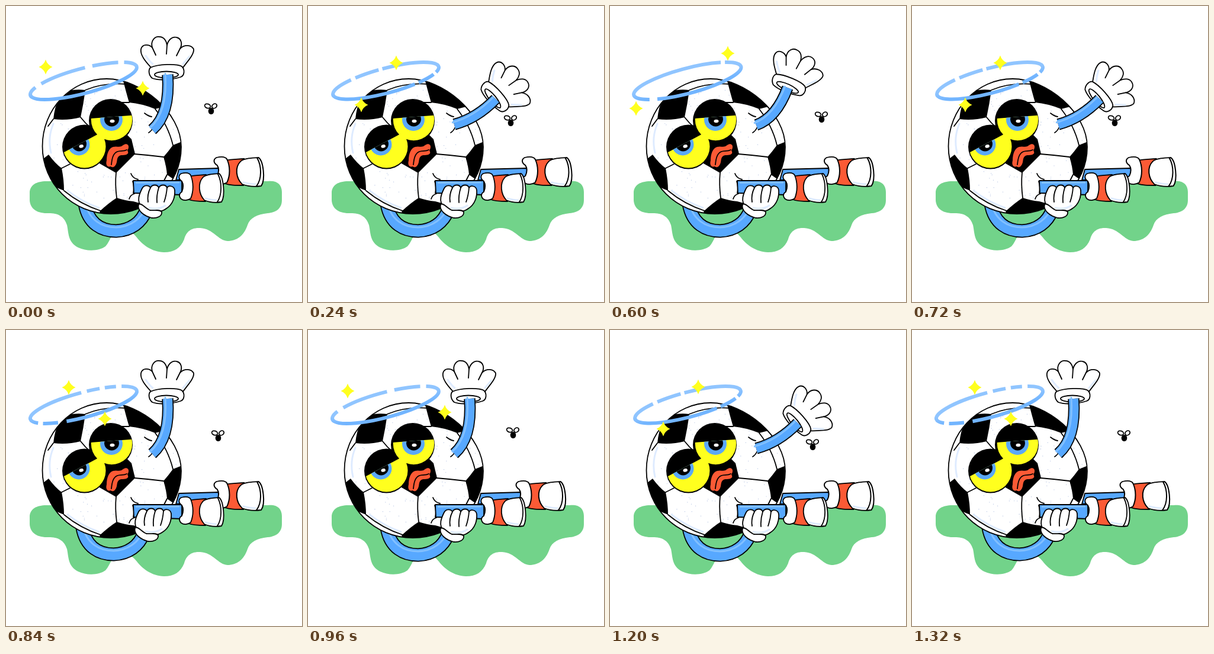
These frames come from a looping animation (500 px wide and 500 px high, 1440 ms). An HTML page:

```html
<!DOCTYPE html>
<html lang="en">
<head>
<meta charset="utf-8">
<title>Dizzy ball</title>
<style>
html, body { margin: 0; width: 100%; height: 100%; overflow: hidden; background: #fff; }
svg { display: block; width: 100%; height: 100%; }
.ink { fill: none; stroke: #000; stroke-width: 1.8; stroke-linecap: round; stroke-linejoin: round; }
.white { fill: #fff; }
.blue { fill: #57a8ff; }
.red { fill: #fc5a35; }
.tint { fill: none; stroke: #deebff; stroke-width: 3; stroke-linecap: round; }
.tube { fill: none; stroke: #000; }
.fill { fill: none; stroke: #57a8ff; }
.shine { fill: none; stroke: #82c0ff; stroke-width: 3; }
</style>
</head>
<body>
<svg viewBox="0 0 500 500">
  <defs>
    <path id="ball" d="M170 123 C228 123 296 180 296 238 C296 302 242 351 177 351 C112 351 61.500 300 61.500 237 C61.500 174 110 123 170 123Z"/>
    <clipPath id="ballClip"><use href="#ball"/></clipPath>
    <clipPath id="lidR"><path d="M130 191 L222 184 V240 H130Z"/></clipPath>
    <clipPath id="lidL"><path d="M85 254 L160 214 L180 214 V290 H85Z"/></clipPath>
    <linearGradient id="sky" gradientUnits="userSpaceOnUse" x1="126" y1="108" x2="136" y2="146">
      <stop offset=".4" stop-color="#90c5ff"/>
      <stop offset=".8" stop-color="#72b5ff"/>
    </linearGradient>
    <g id="boot">
      <path class="ink red" d="M309 288 C318 286 327 286 338 285 L337 330 C325 330 316 330 309 327Z"/>
      <path class="ink white" d="M333 289 C339 284 350 284 360 283 C367 288 371 320 364 331 C352 333 342 331 335 328 C326 318 323 300 333 289Z"/>
      <path class="tint" d="M337 325 Q347 328 355 328"/>
      <path class="ink" d="M358 284 C365 298 365 319 357 331"/>
      <path class="ink white" d="M296 283 C304 281 310 282 312 286 C317 298 317 313 312 325 C307 329 300 329 296 326 C291 321 293 316 297 314 C300 307 300 301 297 296 C291 292 291 286 296 283Z"/>
    </g>
    <path id="spark" fill="#ffff1e" d="M0 -12.500 Q2.800 -3.600 11.500 0 Q2.800 3.600 0 12.500 Q-2.800 3.600 -11.500 0 Q-2.800 -3.600 0 -12.500Z"/>
  </defs>

  <path fill="#72d38a" d="M40 316 C40 302 52 296 68 296 H442 C458 294 466 302 466 314 V328 C466 342 456 349 442 350
    C424 352 412 358 408 370 C402 388 390 397 374 397 C358 396 350 376 328 375 C311 374 304 383 301 394
    C295 409 284 416 267 416 C246 415 231 404 221 391 C212 379 199 375 189 378 C178 383 177 396 168 406
    C157 414 137 415 122 408 C104 399 106 383 103 370 C98 355 88 350 72 350 C51 351 40 341 40 327Z"/>

  <g id="lowArm"></g>

  <use href="#ball" fill="#fff"/>
  <g clip-path="url(#ballClip)">
    <g id="dots" fill="#bccae6"></g>
    <path class="tint" d="M80 199 Q70 222 76 248 M104 312 Q130 332 157 341"/>
    <path d="M105 143 Q120 140 134 142 Q131 165 126 188 Q103 194 80 191 Q82 170 90 155 L85 130 L100 120Z"/>
    <path d="M196 118 Q202 143 208 163 Q230 165 252 174 L275 168 L240 115Z"/>
    <path d="M305 226 L282 235 Q274 246 266 255 Q271 271 272 285 L285 294 L305 290Z"/>
    <path d="M158 347 Q173 333 187 324 Q202 329 215 330 L244 338 L225 365 L165 365Z"/>
    <path d="M55 264 L72 251 Q83 266 94 274 Q98 294 98 312 L86 307 L58 310Z"/>
    <path class="ink" d="M126 188 Q134 198 142 205 M195 163 L208 163 M252 174 Q274 202 282 235 M217 250 Q242 252 266 255
      M186 281 Q184 302 187 324 M94 274 L108 267 M98 312 Q126 335 160 346 M272 285 Q258 315 238 338 M80 191 L71 203 M134 142 Q165 129 203 132"/>
  </g>
  <use href="#ball" class="ink"/>

  <path d="M205 218 L212 225 L218 250 L186 282 L158 266 L140 215Z"/>
  <circle cx="177" cy="194" r="37"/>
  <circle cx="132.500" cy="238" r="37.500"/>
  <g id="eyes">
    <g clip-path="url(#lidR)">
      <circle cx="178.500" cy="192.500" r="34.700" fill="#ffff1e"/>
      <circle cx="178" cy="192" r="19" fill="#5ba8f7"/>
      <circle cx="178.500" cy="191" r="12.500"/>
    </g>
    <ellipse cx="179.500" cy="194.500" rx="4" ry="2.800" fill="#fff"/>
    <g clip-path="url(#lidL)">
      <circle cx="132.500" cy="237.500" r="36" fill="#ffff1e"/>
      <circle cx="123" cy="234" r="18.500" fill="#5ba8f7"/>
      <circle cx="123.500" cy="233" r="12.500"/>
    </g>
    <ellipse cx="127.500" cy="237" rx="3.800" ry="2.800" fill="#fff" transform="rotate(-15 127 238)"/>
  </g>
  <path class="red" d="M170 261 C170 249 174 240 181 238 C188 236 192 240 198 235 C203 231 208 234 207 239 C207 242 204 243 206 246
    C208 251 201 252 195 252 C188 253 188 258 187 264 C185 272 180 274 177 271 C171 273 168 268 170 261Z"/>
  <path class="ink" d="M178 268 C179 257 181 249 188 246 C194 244 198 246 204 243"/>

  <path class="ink" d="M234 181 Q240 186 246 187 M241 214 Q246 211 249 204 M211 283 Q214 291 223 293 M208 326 Q210 319 217 317 M214 296 Q217 305 215 316"/>

  <path id="shin" class="ink blue"/>
  <g id="farBoot"><use href="#boot" transform="translate(27 -27) scale(1.110 1)"/></g>
  <path class="ink blue" d="M215 295 L297 295 V319 L216 316Z"/>
  <path class="shine" d="M219 298.500 L293 298"/>
  <use href="#boot"/>

  <g id="grip">
    <path class="ink white" d="M230 340 C219 330 226 316 230 308 C233 302 241 302 244 307 C247 301 256 301 258 307
      C261 301 270 301 272 307 C275 302 284 304 285 311 C286 322 282 335 271 342 C261 350 239 349 230 340Z"/>
    <path class="ink" d="M244 307 Q238 319 240 331 M258 307 Q254 320 255 332 M272 307 Q271 320 267 331"/>
    <path class="tint" d="M242 341 Q257 345 269 337"/>
    <path class="ink white" d="M224 335 C229 332 234 341 243 345 C252 346 260 343 263 348 C264 355 255 359 246 358 C234 355 221 346 224 335Z"/>
  </g>

  <g id="glove">
    <path class="ink white" d="M-26 -7 C-34 -16 -45 -28 -43 -38 C-41 -47 -30 -47 -24 -41 C-27 -52 -20 -60 -12 -59 C-4 -59 0 -52 1 -45
      C3 -53 9 -60 17 -58 C26 -56 27 -46 23 -39 C30 -46 42 -46 46 -38 C47 -29 35 -17 28 -7Z"/>
    <path class="ink" d="M-24 -41 L-18 -28 M1 -45 L0 -30 M23 -39 L17 -27"/>
    <path class="tint" d="M-35 -27 Q-29 -18 -23 -13 M39 -26 L28 -13"/>
    <path class="ink white" d="M-27 -7 C-14 -13 17 -14 26 -9 C32 -3 30 7 24 9 C8 14 -14 15 -24 11 C-30 6 -31 -3 -27 -7Z"/>
    <ellipse class="ink" cx="0" cy="5" rx="20" ry="5.500"/>
  </g>
  <g id="arm"></g>

  <path id="halo" fill="none" stroke="url(#sky)" stroke-width="6"/>
  <use id="sparkA" href="#spark"/>
  <use id="sparkB" href="#spark"/>

  <g id="fly">
    <ellipse class="ink white" cx="-5.500" cy="-4" rx="5" ry="3.500" transform="rotate(20 -5.500 -4)"/>
    <ellipse class="ink white" cx="6" cy="-4" rx="4.500" ry="3.500" transform="rotate(-35 6 -4)"/>
    <ellipse cx="0.500" cy="4.500" rx="4.800" ry="5.500"/>
  </g>
</svg>
<script>
const $ = id => document.getElementById(id);
const STEP = 120, STEPS = 12, BLINK = 9;

// One entry per pose; gaps are halo angles in degrees.
const poses = [
  { arm: 'M247 209 C269 190 276 158 273 116', glove: [271, 111, 0], reach: 0, grip: [0, 0],
    sparks: [67, 103, 231, 139], fly: [346, 173], gaps: [[209, 221], [275, 283], [314, 323]] },
  { arm: 'M247 201 Q281 189 300 138', glove: [302, 133, 25], reach: 10.5, grip: [0, 0],
    sparks: [199, 80, 44, 173], fly: [357, 187], gaps: [[128, 139], [312, 318]] },
  { arm: 'M247 200 Q285 190 317 157', glove: [316, 153, 51], reach: 10.5, grip: [0, 0],
    sparks: [149, 96, 90, 167], fly: [342, 193], gaps: [[22, 29], [55, 60], [233, 239], [266, 270]] },
  { arm: 'M247 209 C269 190 276 158 273 116', glove: [271, 111, 0], reach: 0, grip: [-6, -1],
    sparks: [106, 97, 167, 150], fly: [358, 178], gaps: [[112, 122], [143, 152], [271, 277], [291, 297], [311, 319]] }
];

const move = (id, x, y, turn = 0) =>
  $(id).setAttribute('transform', `translate(${x} ${y}) rotate(${turn})`);

function tube(id, d, width, dx, dy) {
  $(id).innerHTML = `<path class="tube" stroke-width="${width}" d="${d}"/>` +
    `<path class="fill" stroke-width="${width - 3.5}" d="${d}"/>` +
    `<path class="shine" d="${d}" transform="translate(${dx} ${dy})"/>`;
}

function haloPoint(deg) {
  const t = deg * Math.PI / 180, tilt = -15 * Math.PI / 180;
  const x = 93 * Math.cos(t), y = 21 * Math.sin(t);
  return (131 + x * Math.cos(tilt) - y * Math.sin(tilt)).toFixed(1) + ' ' +
    (126.5 + x * Math.sin(tilt) + y * Math.cos(tilt)).toFixed(1);
}

function haloPath(gaps) {
  return gaps.map(([, from], i) => {
    const to = i + 1 < gaps.length ? gaps[i + 1][0] : gaps[0][0] + 360;
    const large = to - from > 180 ? 1 : 0;
    return `M${haloPoint(from)} A93 21 -15 ${large} 1 ${haloPoint(to)}`;
  }).join('');
}

function speckle() {
  let seed = 7;
  const rnd = () => (seed = seed * 16807 % 2147483647) / 2147483647;
  let out = '';
  for (let i = 0; i < 200; i++) {
    const a = rnd() * 2 * Math.PI, r = 110 * Math.sqrt(rnd());
    out += `<circle cx="${(178 + r * Math.cos(a)).toFixed(1)}" cy="${(237 + r * Math.sin(a)).toFixed(1)}" r=".7"/>`;
  }
  $('dots').innerHTML = out;
}

function show(step) {
  const p = poses[step % poses.length];
  const [gx, gy] = p.grip, [ax, ay, bx, by] = p.sparks;
  tube('arm', p.arm, 19.5, -4, -3);
  move('glove', ...p.glove);
  move('lowArm', gx * 0.7, gy);
  move('grip', gx, gy);
  move('farBoot', p.reach, 0);
  $('shin').setAttribute('d', `M292 276 L${360 + p.reach} 274 V${289 + p.reach / 3} L287 294Z`);
  move('sparkA', ax, ay);
  move('sparkB', bx, by);
  move('fly', ...p.fly);
  $('halo').setAttribute('d', haloPath(p.gaps));
  $('eyes').style.display = step === BLINK ? 'none' : '';
}

let last = -1;
function tick() {
  const step = Math.floor(performance.now() / STEP) % STEPS;
  if (step !== last) show(last = step);
  requestAnimationFrame(tick);
}

speckle();
tube('lowArm', 'M133 334 C139 369 163 380 186 380 C211 379 229 365 236 346', 23, 0, -6);
tick();
</script>
</body>
</html>
```
